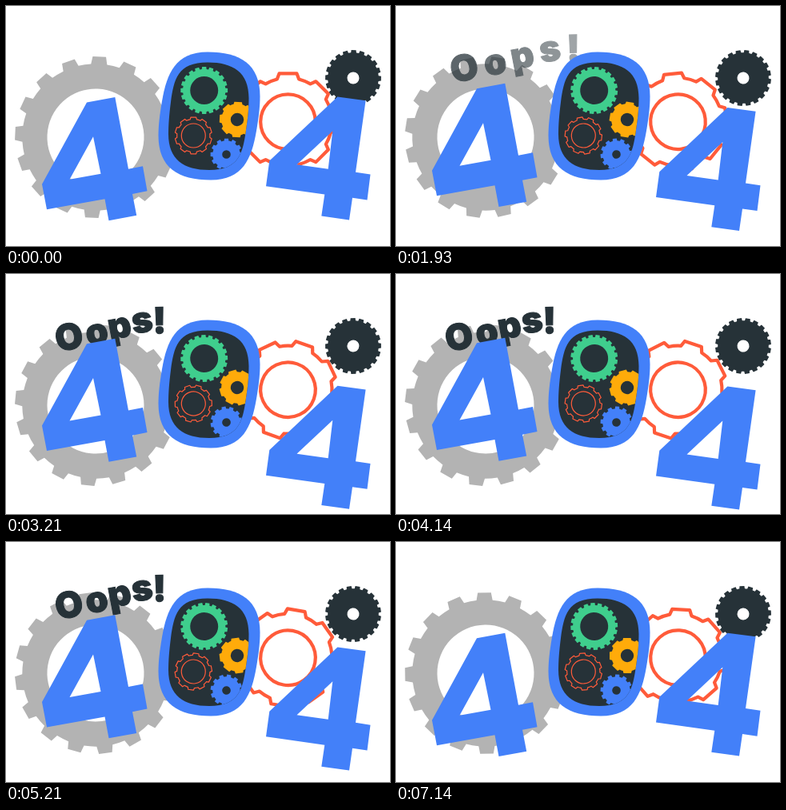
These frames come from a looping animation (480x300 px, 7210 ms). An HTML page:

```html
<!DOCTYPE html>
<html lang="en">
<head>
<meta charset="utf-8">
<title>404</title>
<style>
  html, body { margin: 0; height: 100%; overflow: hidden; background: #fff; }
  svg { display: block; width: 100vw; height: 100vh; }
  text { font: 900 45px Inter, Roboto, sans-serif; text-anchor: middle; fill: #263238; stroke: #263238; stroke-width: 1; }
</style>
</head>
<body>
<svg id="stage" viewBox="0 0 480 300"></svg>
<script>
const LOOP = 7210, STEPS = 101, STEP = LOOP / STEPS;
const BLUE = '#4380f9', DARK = '#263238', ORANGE = '#ff5b3a';
const stage = document.getElementById('stage');

// Closed gear outline plus its round hole, centred on the origin.
function gearPath({ teeth, outer, root, hole, tip = 0.42, base = 0.56 }) {
  const pitch = 2 * Math.PI / teeth;
  const point = (radius, angle) =>
    `${(radius * Math.sin(angle)).toFixed(2)} ${(-radius * Math.cos(angle)).toFixed(2)}`;
  let d = '';
  for (let i = 0; i < teeth; i++) {
    const a = i * pitch, b = base * pitch / 2, c = tip * pitch / 2;
    d += i ? `A${root} ${root} 0 0 1 ` : 'M';
    d += `${point(root, a - b)}L${point(outer, a - c)}L${point(outer, a + c)}L${point(root, a + b)}`;
  }
  d += `A${root} ${root} 0 0 1 ${point(root, -base * pitch / 2)}Z`;
  return d + `M${-hole} 0a${hole} ${hole} 0 1 0 ${2 * hole} 0a${hole} ${hole} 0 1 0 ${-2 * hole} 0Z`;
}

const gears = {
  gray:   { x: 112, y: 164, teeth: 16, outer: 101, root: 91.7, hole: 60.5, fill: '#b3b3b3', start: 2.7, turn: 1 },
  orange: { x: 352.5, y: 144.7, teeth: 8, outer: 61.3, root: 55, hole: 34.3, line: 4.2, start: 0, turn: -1, tip: 0.46, base: 0.64 },
  black:  { x: 434, y: 90, teeth: 20, outer: 35, root: 31.8, hole: 7.5, fill: DARK, start: 1, turn: 1, tip: 0.54, base: 0.68 },
  green:  { x: 247.7, y: 105.5, teeth: 20, outer: 29.5, root: 26.6, hole: 17.5, fill: '#3fce8d', start: 0, turn: 1, tip: 0.56, base: 0.7 },
  yellow: { x: 289, y: 142, teeth: 8, outer: 22.5, root: 19.8, hole: 8.2, fill: '#ffab0a', start: 3, turn: 1, tip: 0.54, base: 0.72 },
  red:    { x: 234.3, y: 162, teeth: 10, outer: 23.2, root: 20.6, hole: 15, line: 1.2, start: 0, turn: 1, tip: 0.46, base: 0.64 },
  blue:   { x: 275.5, y: 185.5, teeth: 12, outer: 20, root: 17.2, hole: 5.3, fill: BLUE, start: 0, turn: -1, tip: 0.48, base: 0.62 },
};

const gear = name => {
  const g = gears[name];
  const paint = g.line
    ? `fill="none" stroke="${ORANGE}" stroke-width="${g.line}" stroke-linejoin="round"`
    : `fill="${g.fill}" fill-rule="evenodd"`;
  return `<path id="${name}" d="${gearPath(g)}" ${paint}/>`;
};

// Resting baseline point and tilt of each letter.
const letters = [
  ['O', 82.3, 94, -13], ['o', 116, 87.2, -11], ['p', 144.5, 79.8, -11],
  ['s', 172, 73, -8], ['!', 192, 74, -1],
];

const INNER = `M252 70.5C214 70.5 210 92 206 120C204 136 203 148 203 160C203 192 222 205 254 205
  C292 205 296 183 300 155C302.5 139 303.5 128 303.5 115C303.5 83 284 70.5 252 70.5Z`;

stage.innerHTML = `
  <clipPath id="window"><path d="${INNER}"/></clipPath>
  ${gear('gray')}${gear('orange')}${gear('black')}
  ${letters.map(([char]) => `<text>${char}</text>`).join('')}
  <path id="leftFour" fill="${BLUE}" fill-rule="evenodd" d="M101 120.7L136.3 114.2L153 204L171 200.5L176.5 231.5
    L158 235.2L163.2 262L128.5 268.3L123.5 241.5L51 254.5L45 223ZM109 163.5L118.5 210L79.5 217Z"/>
  <path id="rightFour" fill="${BLUE}" fill-rule="evenodd" d="M414.4 113.4L449.6 118.1L437 207.7L455.5 210.5L451.5 242.4
    L433 239.7L429 267.3L394.3 262.5L398.3 235.5L325 225.2L329.3 193.5ZM408.3 156.2L402.7 203.7L363.5 198.2Z"/>
  <path fill="${BLUE}" d="M252 57.5C212 57.5 201 84 195 119C192 137 190.5 149 190.5 162C190.5 202 215 217.5 256 217.5
    C296 217.5 307 191 313 156C316 138 317.5 126 317.5 113C317.5 73 293 57.5 252 57.5Z"/>
  <path fill="${DARK}" d="${INNER}"/>
  <g clip-path="url(#window)">${gear('green')}${gear('yellow')}${gear('red')}${gear('blue')}</g>`;

const byId = id => document.getElementById(id);
const glyphs = [...stage.querySelectorAll('text')];
const clamp = v => Math.min(1, Math.max(0, v));

function draw(now) {
  const step = Math.floor((now % LOOP + 5) / STEP) % STEPS;
  const time = step * STEP, phase = step / STEPS;

  for (const [name, g] of Object.entries(gears))
    byId(name).setAttribute('transform', `translate(${g.x} ${g.y}) rotate(${g.start + 360 * g.turn * phase})`);

  const bob = (1 - Math.cos(2 * Math.PI * (time - 150) / LOOP)) / 2;
  byId('leftFour').setAttribute('transform', `translate(0 ${-35.5 * bob})`);
  byId('rightFour').setAttribute('transform', `translate(0 ${28 * bob})`);

  // Letters slide in one after another, then the word fades in place.
  const fadeOut = clamp((6900 - time) / 1300);
  letters.forEach(([, x, y, tilt], i) => {
    const shown = clamp((time - 300 - 165 * i) / 2200);
    const away = (1 - shown) ** 2;
    glyphs[i].setAttribute('transform', `translate(${x + 95 * away} ${y - 17 * away}) rotate(${tilt})`);
    glyphs[i].setAttribute('opacity', shown * fadeOut);
  });
}

function tick() {
  draw(performance.now());
  requestAnimationFrame(tick);
}
tick();
</script>
</body>
</html>
```
